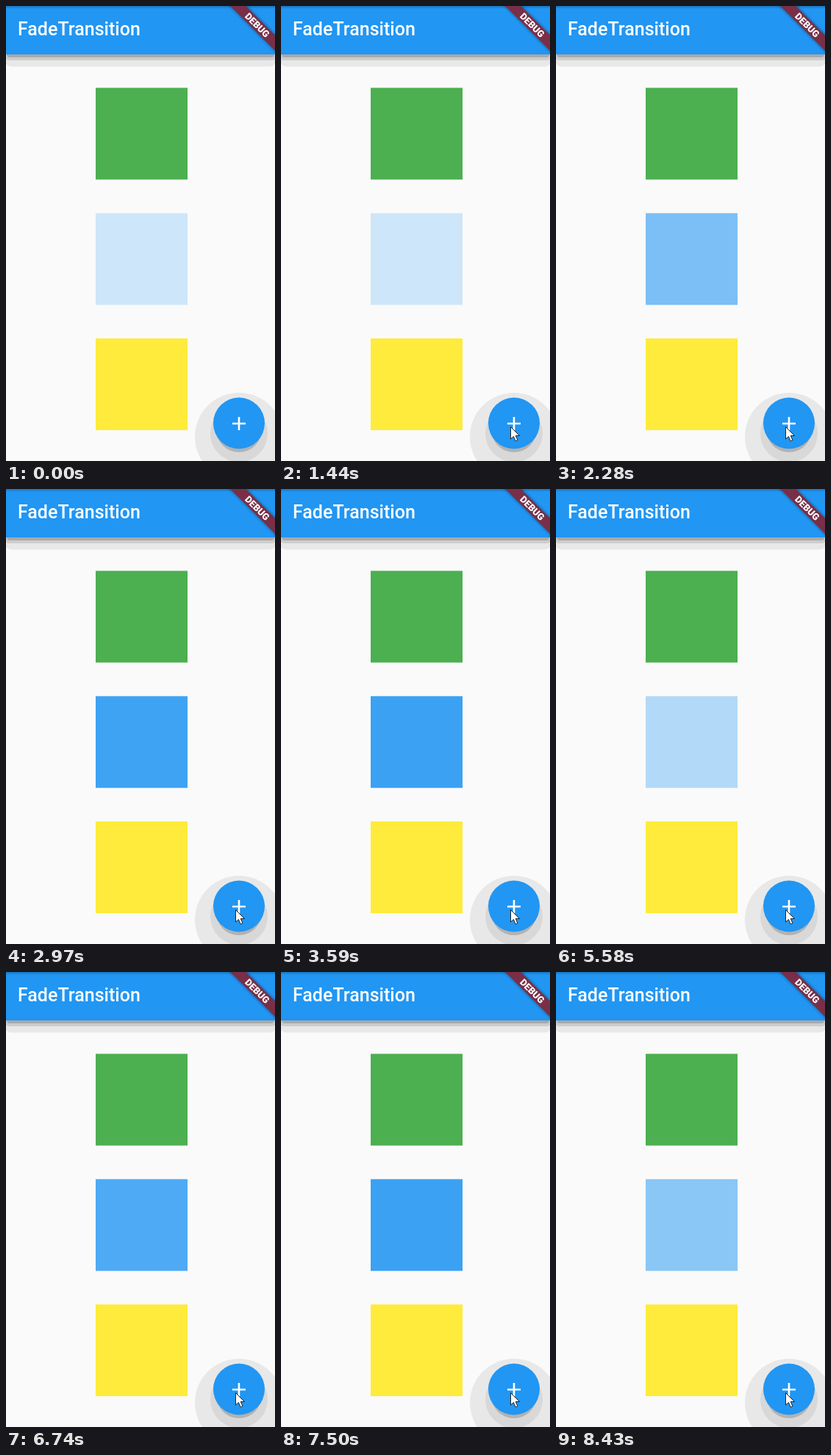
An HTML page that plays this animation: 366 by 620 pixels, repeating every 8580 ms.

```html
<!DOCTYPE html>
<html lang="en">
<head>
<meta charset="utf-8">
<title>FadeTransition</title>
<style>
  html, body { margin: 0; width: 100%; height: 100%; overflow: hidden; background: #fafafa; }
  svg { display: block; }
  text { font-family: Roboto, sans-serif; fill: #fff; }
</style>
</head>
<body>
<svg width="366" height="620" viewBox="0 0 366 620">
  <defs>
    <clipPath id="fabClip"><circle cx="317" cy="568.5" r="35"/></clipPath>
    <linearGradient id="topShade" x2="0" y2="1">
      <stop stop-opacity=".22"/><stop offset="1" stop-opacity="0"/>
    </linearGradient>
  </defs>

  <!-- App bar -->
  <rect x="-1" y="50" width="368" height="32.5" rx="8" fill="#e8e8e8"/>
  <rect x="-1" y="50" width="368" height="24" rx="5" fill="#cdcdcd"/>
  <rect x="1" y="50" width="364" height="20" rx="4" fill="#a9a9a9"/>
  <rect width="366" height="66" fill="#2196f3"/>
  <rect width="366" height="4" fill="url(#topShade)"/>
  <text x="16" y="40" font-size="25" font-weight="500">FadeTransition</text>

  <!-- Corner banner -->
  <g transform="translate(366 0) rotate(45)">
    <rect x="-60" y="28" width="120" height="15" fill="#782f47" style="filter: drop-shadow(0 0 2px #0007)"/>
    <text x="1.4" y="40" font-size="12.75" font-weight="900" text-anchor="middle">DEBUG</text>
  </g>

  <!-- Squares -->
  <rect x="122" y="111.5" width="125" height="125" fill="#4caf50"/>
  <rect id="fade" x="122" y="282.3" width="125" height="125" fill="#2196f3"/>
  <rect x="122" y="453" width="125" height="125" fill="#ffeb3b"/>

  <!-- Floating button -->
  <circle cx="317" cy="587" r="60" fill="#e8e8e8"/>
  <circle cx="317" cy="582.5" r="39" fill="#d8d8d8"/>
  <circle cx="317" cy="577" r="31" fill="#b2b2b2"/>
  <circle cx="317" cy="568.5" r="35" fill="#2196f3"/>
  <circle id="ripple" cx="313" cy="573" fill="#fff" clip-path="url(#fabClip)"/>
  <path d="M308 569H326M317 560V578" stroke="#fff" stroke-width="2.6"/>

  <path id="cursor" d="M0 0V16.5L3.9 13L6.6 19.3L9.4 18.1L6.8 12H12Z" fill="#fff" stroke="#222" stroke-width="1"/>
</svg>
<script>
  const LOOP = 8580, TICK = 230;
  // Fade runs: start time, first opacity, change per tick
  const runs = [
    [0, .2, 0], [1510, .277, 0], [1590, .309, .092],
    [3590, .88, -.092], [5580, .332, .092], [7500, .878, -.092]
  ];
  const [fade, ripple, cursor] = ['fade', 'ripple', 'cursor'].map(id => document.getElementById(id));

  function opacityAt(t) {
    const [start, first, delta] = runs.findLast(run => t >= run[0]);
    return first + delta * Math.min(7, Math.floor((t - start) / TICK));
  }

  const bezier = (a, b, c, u) => (1 - u) ** 2 * a + 2 * u * (1 - u) * b + u * u * c;

  function draw(now) {
    const t = now % LOOP;
    fade.setAttribute('opacity', opacityAt(t));

    const u = Math.min(1, Math.floor((t - 430) / 101) / 10);
    cursor.setAttribute('visibility', t < 430 ? 'hidden' : 'visible');
    cursor.setAttribute('transform', `translate(${bezier(362, 236, 312.5, u)} ${bezier(474, 515, 573.5, u)})`);

    const press = t < 1510 ? 0 : Math.max(0, 1 - (t - 1510) / 540);
    ripple.setAttribute('r', 18 + 24 * (1 - press));
    ripple.setAttribute('opacity', .14 * press);
    requestAnimationFrame(draw);
  }
  requestAnimationFrame(draw);
</script>
</body>
</html>
```
